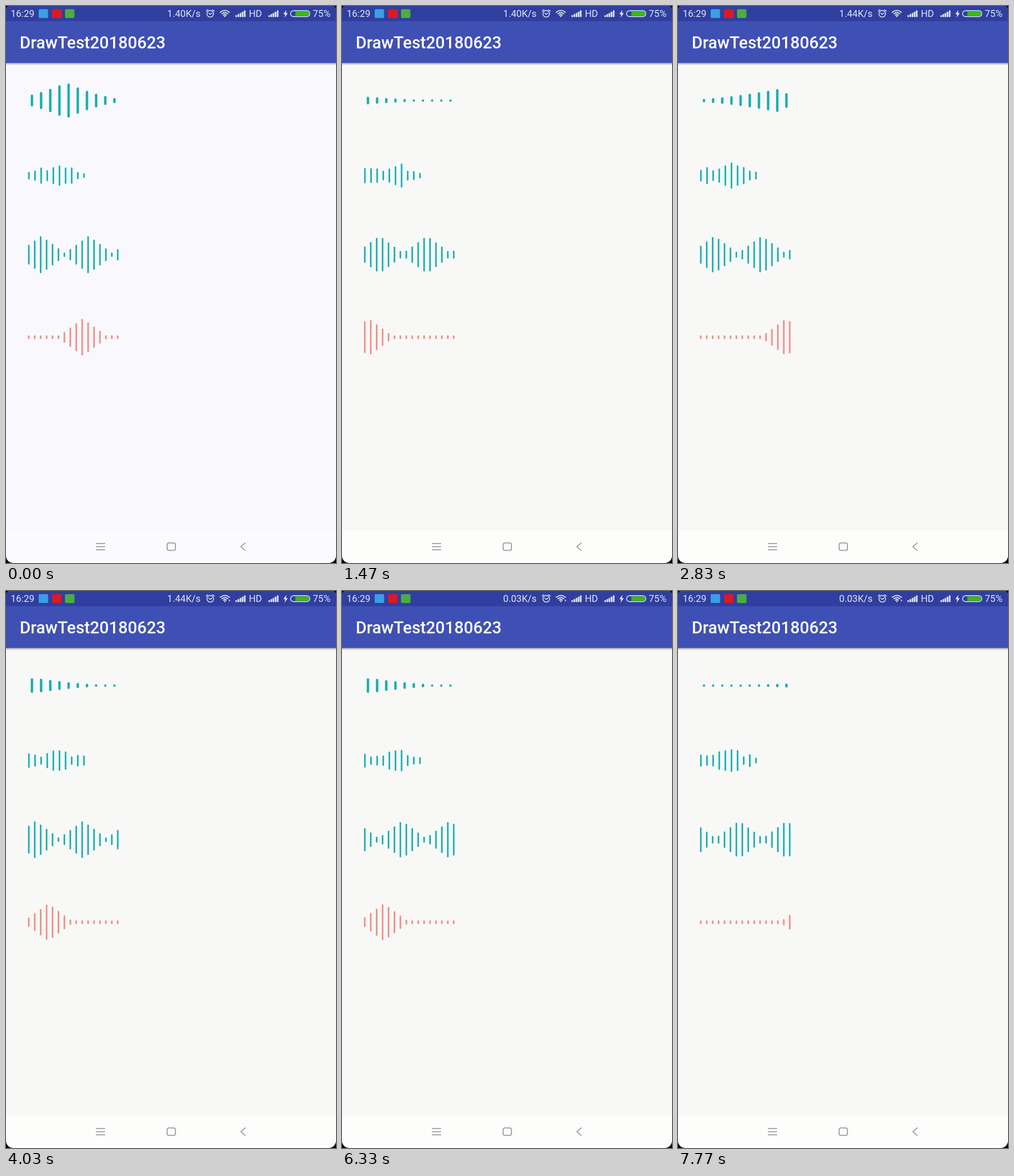
Animation, 576 px wide and 972 px high, one loop 7.81 s. Source, as an HTML page:

```html
<!DOCTYPE html>
<html lang="en">
<head>
<meta charset="utf-8">
<title>Voice bars</title>
<style>
  html, body { margin: 0; width: 100%; height: 100%; overflow: hidden; background: #000; }
  svg { display: block; width: 576px; height: 972px; }
  text { font-family: Roboto, "Open Sans", sans-serif; fill: #fff; }
  .status { font-size: 16.6px; fill: #e3e6f4; }
  .line { fill: none; stroke: #e3e6f4; stroke-width: 1.4; stroke-linecap: round; stroke-linejoin: round; }
  .nav { fill: none; stroke: #8e9196; stroke-width: 1.6; }
</style>
</head>
<body>
<svg viewBox="0 0 576 972">
  <defs>
    <clipPath id="screen">
      <path d="M8 0H568Q576 0 576 8V957Q576 972 561 972H15Q0 972 0 957V8Q0 0 8 0Z"/>
    </clipPath>
    <linearGradient id="shade" x2="0" y2="1">
      <stop stop-color="#000" stop-opacity=".3"/>
      <stop offset="1" stop-color="#000" stop-opacity="0"/>
    </linearGradient>
    <g id="signal" fill="#e3e6f4">
      <rect y="8.5" width="2.8" height="3"/>
      <rect x="3.7" y="6.5" width="2.8" height="5"/>
      <rect x="7.4" y="4.5" width="2.8" height="7"/>
      <rect x="11.1" y="2.3" width="2.8" height="9.2"/>
      <rect x="14.8" width="2.8" height="11.5"/>
    </g>
  </defs>
  <g clip-path="url(#screen)">
    <rect id="page" width="576" height="972"/>
    <rect id="navbar" y="915" width="576" height="57"/>
    <rect y="99" width="576" height="5" fill="url(#shade)"/>
    <rect width="576" height="99.5" fill="#3f50b5"/>
    <rect width="576" height="26.5" fill="#303f9f"/>

    <text class="status" x="8.3" y="19.3">16:29</text>
    <rect x="57" y="5.5" width="16.5" height="15.5" rx="2" fill="#3a9fe3"/>
    <rect x="80.5" y="5.5" width="16.5" height="15.5" rx="2" fill="#db1a1c"/>
    <rect x="103" y="5.5" width="16.5" height="15.5" rx="2" fill="#4cae3c"/>
    <text class="status" id="speed" x="339.5" y="19.3" text-anchor="end"></text>

    <g class="line">
      <circle cx="356.5" cy="13.6" r="5.8"/>
      <path d="M353.8 12.5L356.5 14.6L359.5 12.2M349.4 9L352.5 6.4M363.6 9L360.5 6.4"/>
      <path stroke-width="1.7" d="M374 11Q382 4.2 390 11M376.8 13.6Q382 9.4 387.2 13.6M379.5 16Q382 14 384.5 16"/>
    </g>
    <circle cx="382" cy="18" r="1.3" fill="#e3e6f4"/>
    <path id="traffic" d="M388.5 15.5h3l-1.5 3.2z" fill="#e3e6f4"/>
    <use href="#signal" x="400.5" y="7.7"/>
    <text class="status" x="424" y="19.3">HD</text>
    <use href="#signal" x="458" y="7.7"/>
    <path d="M489.5 7L484 14.2H487.3L486.3 20L492 12.4H488.6Z" fill="#e3e6f4"/>
    <rect x="496.7" y="8.3" width="33.6" height="10.2" rx="5.1" class="line"/>
    <path d="M505 9.6H525.5a3.8 3.8 0 0 1 0 7.6H505Z" fill="#3cb916"/>
    <text class="status" x="535.5" y="19.3">75%</text>

    <text x="24" y="73.6" font-size="29" font-weight="500">DrawTest20180623</text>

    <g id="bars"></g>

    <g class="nav">
      <path d="M157 938H173M157 943.5H173M157 949H173"/>
      <rect x="281.3" y="937" width="14.4" height="13" rx="3"/>
      <path d="M418 936.5L410 943.5L418 950.5"/>
    </g>
  </g>
</svg>
<script>
const LOOP = 7810, SWEEP = 2306, TEAL = "#14afaf", PINK = "#f98881";
const find = id => document.getElementById(id);
const mod = (a, n) => ((a % n) + n) % n;

function makeRow(count, x, gap, y, width, color) {
  const bars = Array.from({ length: count }, (_, i) => {
    const bar = document.createElementNS("http://www.w3.org/2000/svg", "rect");
    bar.setAttribute("x", x + i * gap - width / 2);
    bar.setAttribute("width", width);
    bar.setAttribute("rx", width / 2);
    bar.setAttribute("fill", color);
    find("bars").append(bar);
    return bar;
  });
  return heightAt => bars.forEach((bar, i) => {
    const h = heightAt(i);
    bar.setAttribute("y", y - h / 2);
    bar.setAttribute("height", h);
  });
}

const swell = makeRow(10, 45.3, 16, 165, 4.2, TEAL);
const jitter = makeRow(10, 40, 10.67, 296, 2.7, TEAL);
const ripple = makeRow(16, 39.8, 10.35, 434, 2.7, TEAL);
const pulse = makeRow(16, 39.8, 10.35, 578, 2.7, PINK);

// A crest speeds up to the right, grows steadily, then collapses;
// each flank is a parabola down to its own end.
function swellHeight(t) {
  const s = mod(t - 1020, SWEEP) / 1000 - 0.45;
  const crest = -1 + 4.2 * s + 1.75 * s * s;
  const fall = Math.max(0, s - 0.9);
  const size = Math.max(1.8, Math.min(4.05 + 4.7 * s, 8.1 - 8.2 * fall * fall));
  const left = -5, right = 11.4 + 0.22 * crest;
  return i => {
    const edge = i < crest ? left : right;
    const root = Math.max(0, size * (i - edge) / (crest - edge));
    return Math.max(4.2, root * root);
  };
}

// Fresh random heights every 100 ms, tallest just right of the middle.
function jitterHeight(t) {
  const slot = Math.floor(t / 100);
  return i => {
    const noise = mod(Math.sin(slot * 12.99 + i * 78.23) * 43758.5, 1);
    const typical = 22 + 19 * Math.exp(-(((i - 5.2) / 1.4) ** 2)) - 3 * Math.max(0, i - 6);
    const spread = i > 3 && i < 7 ? 0.2 : 0.4;
    return typical * (1 + spread * (2 * noise - 1));
  };
}

// Triangle wave, eight bars long.
function rippleHeight(t) {
  const crest = 2.1 + t * 8 / 1400;
  return i => 66 - 15 * Math.abs(mod(i - crest + 4, 8) - 4);
}

// A single triangle that crosses the row.
function pulseHeight(t) {
  const speed = 0.01007;
  const crest = mod(13.1 + t * speed, SWEEP * speed) - 4;
  return i => Math.max(6.5, 65.5 - 15 * Math.abs(i - crest));
}

function draw(time) {
  const t = Math.floor((time % LOOP + 4) * 0.03) / 0.03;
  swell(swellHeight(t));
  jitter(jitterHeight(t));
  ripple(rippleHeight(t));
  pulse(pulseHeight(t));
  find("speed").textContent = t < 1900 ? "1.40K/s" : t < 5900 ? "1.44K/s" : "0.03K/s";
  find("traffic").setAttribute("opacity", t < 3400 ? 0 : 1);
  find("page").setAttribute("fill", t < 66 ? "#f9f8fd" : "#f8f8f7");
  find("navbar").setAttribute("fill", t < 66 ? "#fbfaff" : "#fdfdfc");
}

const start = performance.now();
function tick() {
  draw(performance.now() - start);
  requestAnimationFrame(tick);
}
tick();
</script>
</body>
</html>
```
